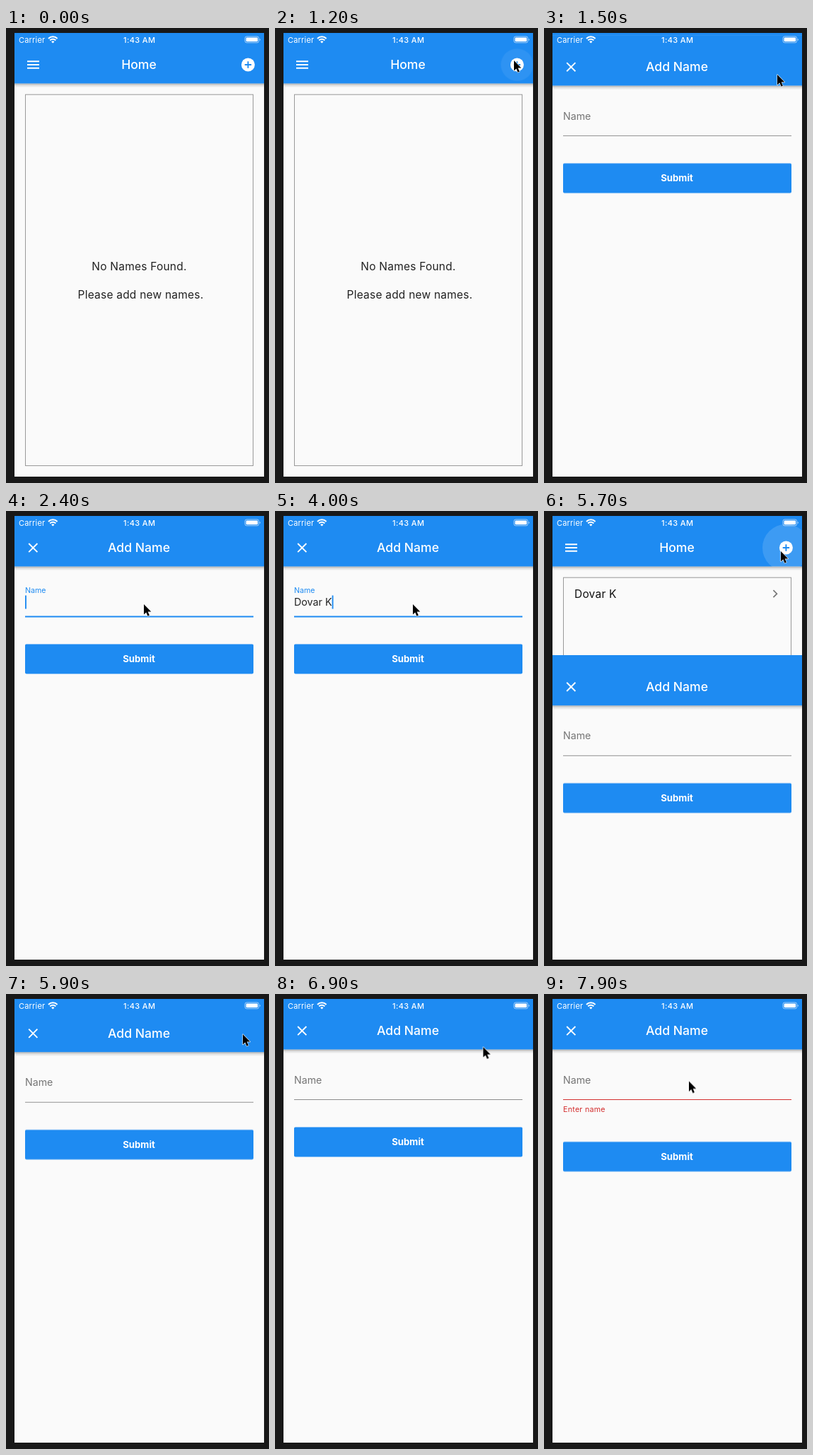
These frames come from a looping animation (372x644 px, 8000 ms). An HTML page:

```html
<!DOCTYPE html>
<html lang="en">
<head>
<meta charset="utf-8">
<title>Name list</title>
<style>
  html, body { margin: 0; width: 100%; height: 100%; overflow: hidden; background: #181818; }
  svg { display: block; width: 372px; height: 644px; font-family: Inter, "Open Sans", sans-serif; }
  text { white-space: pre; }
  .blue { fill: #1e8bf2; }
  .mid { text-anchor: middle; }
  .title { font-size: 17.6px; font-weight: 500; fill: #fff; text-anchor: middle; }
  .body { font-size: 15.5px; letter-spacing: .22px; fill: #222; }
  .icon { fill: none; stroke: #fff; stroke-width: 1.9; }
  .status { font-size: 11px; fill: #fff; }

  .sheet, .empty, .filled, .ripple, .wave, .label, .focus, .error, .red, .button, .mouse {
    animation: 8s linear infinite;
  }
  .sheet { animation-name: sheet; animation-timing-function: cubic-bezier(.35, .91, .33, .97); }
  .empty { animation-name: empty; animation-timing-function: step-end; }
  .filled { animation-name: filled; animation-timing-function: step-end; }
  .ripple { animation-name: ripple; transform-box: fill-box; transform-origin: center; fill: #fff; }
  .wave { animation-name: wave; transform-box: fill-box; transform-origin: center; fill: #fff; }
  .label { animation-name: label; animation-timing-function: cubic-bezier(.4, 0, .2, 1); font-size: 14.2px; }
  .focus { animation-name: focus; }
  .error { animation-name: error; font-size: 10.7px; letter-spacing: .25px; fill: #d32f2f; }
  .red { animation-name: red; }
  .button { animation-name: button; animation-timing-function: step-end; }
  .mouse { animation-name: mouse; animation-timing-function: cubic-bezier(.4, 0, .4, 1); }

  @keyframes sheet {
    0%, 15.04% { transform: translateY(628px); }
    19.16%, 58.53% { transform: translateY(0); }
    62.65%, 70.1% { transform: translateY(628px); }
    74.23%, 100% { transform: translateY(0); }
  }
  @keyframes empty { 0% { opacity: 1; } 50%, 100% { opacity: 0; } }
  @keyframes filled { 0% { opacity: 0; } 50%, 100% { opacity: 1; } }
  @keyframes ripple {
    0%, 13.8% { transform: scale(.3); opacity: 0; }
    16%, 16.8% { transform: scale(1); opacity: .14; }
    19%, 20% { transform: scale(1); opacity: 0; }
    69% { transform: scale(.3); opacity: 0; }
    71%, 72% { transform: scale(1); opacity: .14; }
    74.5%, 100% { transform: scale(1); opacity: 0; }
  }
  @keyframes wave {
    0%, 57% { transform: scale(.1); opacity: 0; }
    57.6% { opacity: .14; }
    60% { transform: scale(1); opacity: .14; }
    62%, 64% { transform: scale(1); opacity: 0; }
    64.1%, 92.2% { transform: scale(.1); opacity: 0; }
    92.8% { opacity: .14; }
    96% { transform: scale(1); opacity: .14; }
    98.5%, 100% { transform: scale(1); opacity: 0; }
  }
  @keyframes label {
    0%, 27.5% { transform: translate(27px, 126.7px) scale(1); fill: #757575; }
    30%, 63% { transform: translate(27px, 116px) scale(.75); fill: #1e8bf2; }
    63.1%, 100% { transform: translate(27px, 126.7px) scale(1); fill: #757575; }
  }
  @keyframes focus { 0%, 27.5% { opacity: 0; } 30%, 63% { opacity: 1; } 63.1%, 100% { opacity: 0; } }
  @keyframes error {
    0%, 93.75% { opacity: 0; transform: translateY(-3px); }
    95.8%, 100% { opacity: 1; transform: none; }
  }
  @keyframes red { 0%, 93.75% { opacity: 0; } 95.8%, 100% { opacity: 1; } }
  @keyframes button { 0% { transform: none; } 93.75%, 100% { transform: translateY(20.7px); } }
  @keyframes mouse {
    0%, 1.2% { transform: translate(352px, 14px); opacity: 0; }
    1.25% { transform: translate(352px, 14px); opacity: 1; }
    6%, 16.25% { transform: translate(338px, 46px); }
    18.5%, 24.4% { transform: translate(330px, 66px); }
    28.1%, 51.9% { transform: translate(195px, 132px); }
    56.9%, 63.1% { transform: translate(188px, 229px); }
    68.1%, 85.2% { transform: translate(335px, 57px); }
    86.25% { transform: translate(294.5px, 75px); }
    90.6%, 95.6% { transform: translate(200px, 228px); }
    98.6%, 100% { transform: translate(205px, 123.5px); opacity: 1; }
  }
</style>
</head>
<body>
<svg viewBox="0 0 372 644">
  <defs>
    <clipPath id="screen"><rect x="12" y="7" width="353" height="628"/></clipPath>
    <clipPath id="bar"><rect x="12" y="7" width="353" height="72"/></clipPath>
    <clipPath id="btn"><rect x="27" y="188.3" width="323" height="42.3" rx="2"/></clipPath>
    <linearGradient id="fade" x2="0" y2="1">
      <stop stop-color="#000" stop-opacity=".32"/>
      <stop offset=".4" stop-color="#000" stop-opacity=".12"/>
      <stop offset="1" stop-color="#000" stop-opacity="0"/>
    </linearGradient>
    <g id="page">
      <rect x="12" y="7" width="353" height="628" fill="#fafafa"/>
      <rect x="12" y="78.5" width="353" height="6" fill="url(#fade)"/>
      <rect class="blue" x="12" y="7" width="353" height="71.5"/>
    </g>
  </defs>

  <g clip-path="url(#screen)">
    <!-- home -->
    <use href="#page"/>
    <path class="icon" d="M30 47.3h17M30 52h17M30 56.7h17"/>
    <text class="title" x="188" y="58.4">Home</text>
    <g clip-path="url(#bar)"><circle class="ripple" cx="342.4" cy="52" r="33.4"/></g>
    <circle cx="342.4" cy="52" r="9.5" fill="#fff"/>
    <path d="M337.7 52h9.4M342.4 47.3v9.4" stroke="#1e8bf2" stroke-width="1.9"/>
    <rect x="27.5" y="94.2" width="322" height="525.3" fill="none" stroke="#999"/>
    <g class="empty">
      <text class="body mid" x="188.5" y="343">No Names Found.</text>
      <text class="body mid" x="190.5" y="382.7">Please add new names.</text>
    </g>
    <g class="filled">
      <text class="body" x="43" y="123.2" style="fill:#111">Dovar K</text>
      <path d="M324.4 112.2l5 5-5 5" fill="none" stroke="#777" stroke-width="1.7"/>
    </g>

    <!-- add form -->
    <g class="sheet">
      <use href="#page"/>
      <path class="icon" d="M32.2 46l12.2 12.2M44.4 46l-12.2 12.2"/>
      <text class="title" x="188" y="58.4">Add Name</text>
      <text class="label">Name</text>
      <text id="field" x="27" y="134.2" font-size="14.3" fill="#222"></text>
      <rect id="caret" class="blue" y="119.5" width="1.9" height="19"/>
      <path d="M27 149.5h323" stroke="#8c8c8c"/>
      <path class="focus" d="M27 149.4h323" stroke="#1e8bf2" stroke-width="2"/>
      <path class="red" d="M27 149.5h323" stroke="#d32f2f" stroke-width="1.2"/>
      <text class="error" x="27" y="167.3">Enter name</text>
      <g class="button">
        <g clip-path="url(#btn)">
          <rect class="blue" x="27" y="188" width="323" height="43"/>
          <circle class="wave" cx="190" cy="212" r="170"/>
        </g>
        <text class="mid" x="188" y="214" font-size="13.2" font-weight="700" fill="#fff">Submit</text>
      </g>
    </g>

    <!-- status bar -->
    <text class="status" x="18" y="20.5" letter-spacing=".2">Carrier</text>
    <text class="status mid" x="188.7" y="20.5" font-weight="500" letter-spacing=".35">1:43 AM</text>
    <g fill="none" stroke="#fff" stroke-width="2.1">
      <path d="M60 14.9a8.8 8.8 0 0 1 12.6 0M62.3 17.4a5.7 5.7 0 0 1 8 0"/>
      <path d="M66.3 21.6l-2.1-2.2a3 3 0 0 1 4.2 0z" fill="#fff" stroke="none"/>
    </g>
    <rect x="338" y="12" width="19.6" height="8.8" rx="2.4" fill="none" stroke="#fff" stroke-opacity=".65" stroke-width=".9"/>
    <rect x="339.5" y="13.5" width="16.6" height="5.8" rx="1.2" fill="#fff"/>
    <path d="M358.8 15v3a1.6 1.6 0 0 0 0-3z" fill="#fff" fill-opacity=".65"/>
  </g>

  <path class="mouse" d="M0 0V14.6L3.3 11.5 5.5 16.7 7.9 15.7 5.7 10.6H10.3Z" stroke="#fff" stroke-width="1.1" stroke-linejoin="round" paint-order="stroke"/>
</svg>
<script>
  const LOOP = 8000;
  const name = "Dovar K";
  const keys = [2800, 3200, 3300, 3400, 3470, 3500, 3700];
  const field = document.getElementById("field");
  const caret = document.getElementById("caret");
  const within = (t, from, to) => t >= from && t < to;
  let start;

  function draw(now) {
    start ??= now;
    const t = (now - start) % LOOP;
    const open = within(t, 2250, 5040);
    const text = open ? name.slice(0, keys.filter(k => t >= k).length) : "";
    if (field.textContent !== text) field.textContent = text;
    caret.setAttribute("x", 27 + (text ? field.getComputedTextLength() : 0));
    caret.setAttribute("opacity", open && !within(t, 4200, 4700) ? 1 : 0);
    requestAnimationFrame(draw);
  }
  requestAnimationFrame(draw);
</script>
</body>
</html>
```
